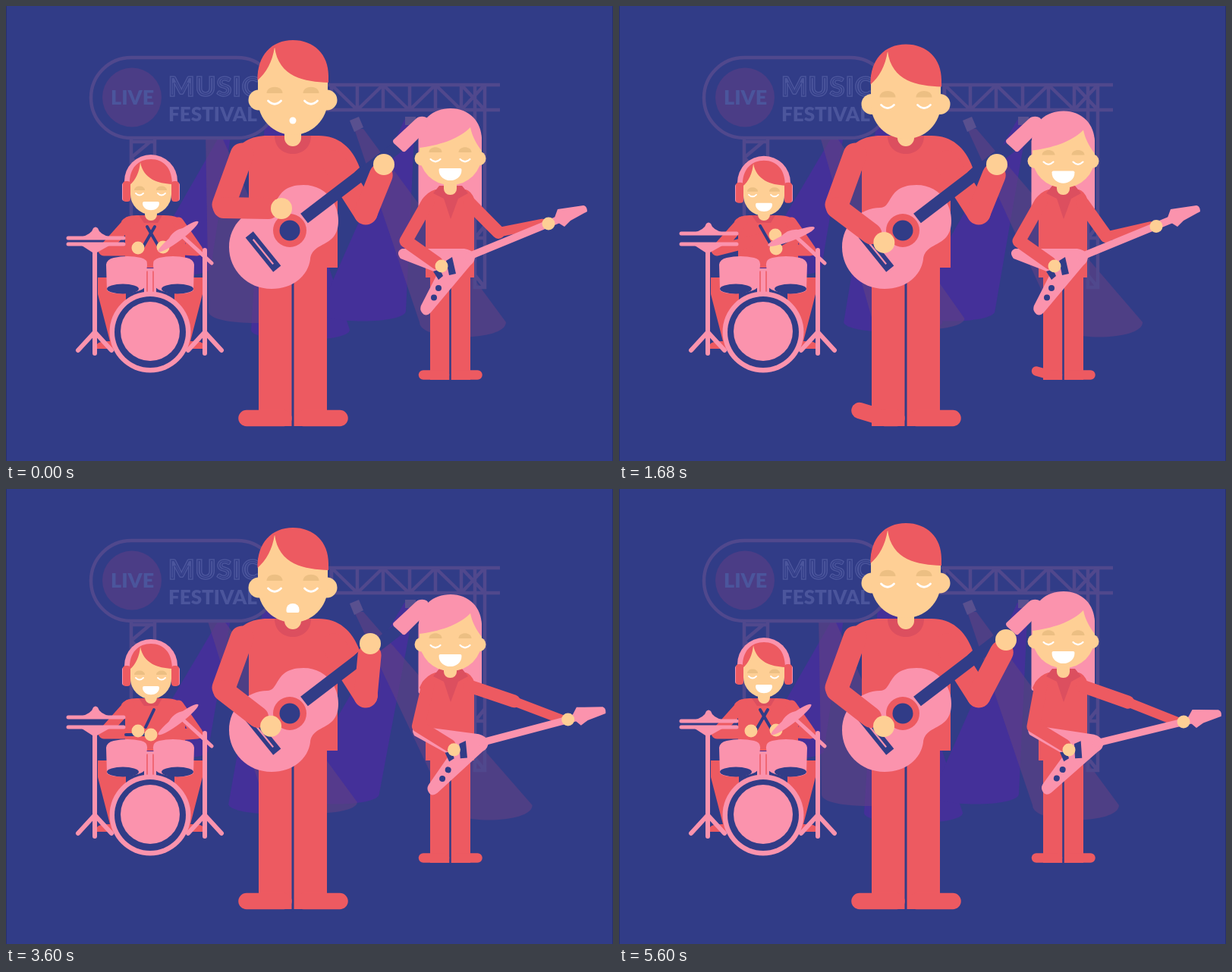
These frames come from a looping animation (800x600 px, 5640 ms). An HTML page:

```html
<!DOCTYPE html>
<html lang="en">
<head>
<meta charset="utf-8">
<title>Live Music Festival</title>
<style>
html, body { margin: 0; width: 100%; height: 100%; overflow: hidden; background: #313c87; }
svg { display: block; width: 100vw; height: 100vh; }
text { font-family: Lato, "Open Sans", sans-serif; font-weight: 900; }
.red { fill: #ed5a61; }
.pink { fill: #fb93ad; }
.skin { fill: #fecf95; }
.dark { fill: #313c87; }
.shade { fill: #dc4f5f; }
.white { fill: #fff; }
.lid { fill: #ecbf83; }
.purple { fill: #443099; }
.mauve { fill: #614184; fill-opacity: .6; }
.line { fill: none; stroke-linecap: round; stroke-linejoin: round; }
.sr { stroke: #ed5a61; }
.sp { stroke: #fb93ad; }
.sd { stroke: #313c87; }
.sw { stroke: #fff; }
.frame { fill: none; stroke: #50488d; stroke-width: 4.5; }
.sign { fill: #4b559c; }
.music { font-size: 36px; letter-spacing: 1px; }
</style>
</head>
<body>
<svg id="stage" viewBox="0 0 800 600"></svg>
<script>
const LOOP = 5640, STEP = 40;

// Markup helpers
const shape = (cls, d, id = '') => `<path id="${id}" class="${cls}" d="${d}"/>`;
const line = (cls, width, d, id = '') =>
  `<path id="${id}" class="line ${cls}" stroke-width="${width}" d="${d}"/>`;
const disc = (cls, x, y, r, id = '') => `<circle id="${id}" class="${cls}" cx="${x}" cy="${y}" r="${r}"/>`;
const box = (cls, x, y, w, h, r = 0) =>
  `<rect class="${cls}" x="${x}" y="${y}" width="${w}" height="${h}" rx="${r}"/>`;
const group = (id, ...parts) => `<g id="${id}">${parts.join('')}</g>`;

const lid = (x, y, w) => shape('lid', `M${x - w} ${y}C${x - w} ${y - w * 1.05} ${x + w} ${y - w * 1.05} ${x + w} ${y}Z`);
const eye = (x, y, w, s) => line('sw', s, `M${x - w} ${y}Q${x} ${y + w} ${x + w} ${y}`);
const eyes = (xs, lidY, eyeY, w, s) => xs.map(x => lid(x, lidY, w + 2) + eye(x, eyeY, w, s)).join('');
const smile = (x, y, w, h) =>
  shape('white', `M${x - w} ${y + 2}q0 -2 2 -2H${x + w - 2}q2 0 2 2C${x + w} ${y + h * 1.3} ${x - w} ${y + h * 1.3} ${x - w} ${y + 2}Z`);

function backdrop() {
  let truss = 'M340 104H651M340 137H651M618 104V373M631 104V373M616 306H633M616 371H633';
  [429, 463, 497, 532, 566, 600].forEach((x, i) => {
    truss += `M${x} 104V137`;
    if (i < 5) truss += i % 2 ? `M${x} 137L${x + 34} 104` : `M${x} 104L${x + 34} 137`;
  });
  truss += 'M600 104L631 137M600 137L631 104M618 306L631 290M618 355L631 371';
  truss += 'M165 176V300M196 176V300M163 179H198M165 200L190 179M165 200L196 232';
  return ['B', 'E', 'D'].map(k => shape('purple', '', 'beam' + k)).join('') +
    ['A', 'C'].map(k => shape('mauve', '', 'beam' + k)).join('') +
    shape('frame', truss) +
    '<path fill="#59508f" d="M453 151L465 146L471 160L459 166ZM526 146H540V157H526Z"/>' +
    '<rect class="frame" x="112" y="68" width="246" height="106" rx="53" style="fill:#313c87"/>' +
    '<circle cx="166" cy="120.500" r="39" fill="#4b3d86"/>' +
    '<g class="sign"><text x="138" y="130" font-size="27">LIVE</text>' +
    '<text x="214" y="152" font-size="26">FESTIVAL</text>' +
    '<text class="music" x="214" y="119" stroke="#313c87" stroke-width="4">MUSIC</text></g>' +
    '<text class="music" x="214" y="119" fill="none" stroke="#4b559c" stroke-width="1.500">MUSIC</text>';
}

function drummer() {
  const tom = shape('pink', 'M132 341Q133 334 142 332Q160 328 178 332Q187 334 186 342L183 370Q180 377 155 379Q138 380 133 375Z') +
    '<ellipse class="dark" cx="154" cy="373" rx="21" ry="6.500"/>';
  const leg = shape('red', 'M121 358H158V452H120V446Q122 442 137 442L121 380Z');
  const mirror = part => `<g transform="translate(380 0) scale(-1 1)">${part}</g>`;
  const stand = x => line('sp', 6, `M${x} 322V458M${x} 430L${x - 22} 454M${x} 430L${x + 22} 454`);
  return leg + mirror(leg) +
    shape('red', 'M172 276H208C224 276 232 280 236 290V345H157V290L152 284Q158 276 172 276Z') +
    line('sr', 15, '', 'armDL') + line('sr', 15, '', 'armDR') +
    shape('shade', 'M175 276H206L200 286H182Z') +
    box('skin', 183, 262, 16, 21, 8) +
    group('headD',
      shape('pink', 'M156 236V231A35 35 0 0 1 226 231V236Z'),
      box('skin', 164, 203, 54, 72, 27),
      shape('red', 'M163 236C162 213 175 202 191 202C208 202 219 214 219 235C200 234 181 228 177 206C176 218 171 230 163 236Z'),
      box('pink', 153, 233, 7, 24, 3), box('red', 154, 231, 10, 27, 4),
      box('pink', 222, 233, 7, 24, 3), box('red', 218, 231, 10, 27, 4),
      eyes([176, 205], 243, 247, 5, 1.8),
      smile(191, 258, 11, 11)) +
    line('sd', 4, '', 'stickL') + line('sd', 4, '', 'stickR') +
    disc('skin', 0, 0, 8.5, 'handDL') + disc('skin', 0, 0, 8.5, 'handDR') +
    stand(117) + stand(262) +
    line('sp', 5, 'M234 305L271 339') +
    line('sp', 5, 'M82 314H155') +
    shape('pink', 'M100 316H136L120 325H114Z') +
    group('hat', line('sp', 5, 'M82 306H155'), shape('pink', 'M98 305Q113 301 115 293Q118 290 121 293Q123 301 138 305Z')) +
    group('crash', '<ellipse class="pink" cx="227" cy="304" rx="33" ry="5.500"/>',
      shape('pink', 'M213 300Q227 292 241 300Z')) +
    box('pink', 182, 346, 16, 38) + line('sr', 1.5, 'M186 350V378M194 350V378') +
    tom + mirror(tom) +
    disc('pink', 190, 430, 53.5) + disc('dark', 190, 430, 47) + disc('pink', 190, 429, 39);
}

function bassist() {
  return group('hairG', box('pink', 543.5, 172, 83.5, 94, 3)) +
    box('red', 559, 350, 53, 143) + line('sd', 2.5, 'M585.500 358V494') +
    line('sr', 12.5, '', 'footG') + line('sr', 12.5, 'M594 486.500H621.500') +
    shape('red', 'M566 242H606Q613 244 617 254V358H553V278L545 262Q552 246 566 242Z') +
    shape('shade', 'M563 247L571 237H601L609 247L596 254L586 281L577 254Z') +
    box('skin', 577, 225, 17, 24, 8) +
    group('headG',
      disc('skin', 548, 201, 9.5), disc('skin', 623, 201, 9.5),
      box('skin', 545, 138, 82, 98, 40),
      shape('pink', 'M544 187V176C544 150 563 135 586 135C610 135 627 152 627 176V191C620 182 614 171 612 160C596 176 570 184 544 187Z'),
      eyes([566, 605], 193, 202, 6.5, 2.2),
      smile(585.5, 214, 15, 16)) +
    line('sr', 17, '', 'armGR') + line('sr', 12.5, '', 'wristGR') +
    group('axe',
      shape('pink', 'M522 320H604Q613 321 618 328Q619 337 612 342L560 404Q553 411 548 404Q545 400 547 395L569 352L520 333Q513 324 522 320Z'),
      line('sp', 9.5, 'M608 331L732 280'),
      shape('pink', 'M723 279L727 268L761 263Q766 264 766 271L744 283L736 291L728 286Z'),
      shape('dark', 'M580 336L588 331L593 353L584 355ZM563 350L572 347L576 356L570 361Z'),
      disc('dark', 570, 372, 4), disc('dark', 564, 384.5, 4)) +
    line('sr', 17, '', 'armGL') +
    disc('skin', 0, 0, 8.5, 'handGL') + disc('skin', 0, 0, 8.5, 'handGR');
}

function singer() {
  return box('red', 333, 340, 90, 214) + line('sd', 3, 'M378 364V556') +
    line('sr', 21.5, '', 'footS') + line('sr', 21.5, 'M392 543.500H440') +
    shape('red', 'M345 171H412C438 171 456 186 466 213L437 240V345H320V206L300 196C308 180 322 171 345 171Z') +
    shape('shade', 'M354 171H402C402 203 354 203 354 171Z') +
    box('skin', 367, 150, 22, 35, 11) +
    group('headS',
      disc('skin', 333, 124, 13.5), disc('skin', 423, 124, 13.5),
      box('skin', 332, 48, 92, 122, 46),
      shape('red', 'M331.500 98C331 65 350 45 378 45C406 45 425 64 425 92V101C394 100 359 94 354 54C351 74 343 88 331.500 98Z'),
      eyes([354, 402], 115, 125, 8.5, 2.8),
      shape('white', '', 'mouth')) +
    line('sr', 32, 'M432 206L474 272') +
    shape('pink', 'M294 318C294 288 318 266 344 266C361 266 353 236 392 236C420 236 438 258 438 283C438 320 404 309 401 334C398 356 378 373 350 373C318 373 294 348 294 318Z') +
    disc('red', 374, 296, 22) + disc('dark', 374, 296, 13.5) +
    '<g transform="rotate(51 339 324)">' + box('dark', 310, 317.5, 58, 13) + box('pink', 318, 323, 42, 2.2) + '</g>' +
    '<path d="M393 280L520 183" stroke="#313c87" stroke-width="16" fill="none"/>' +
    shape('pink', 'M511 176L540 149Q544 145 551 146Q558 147 556 154L552 166L527 191Q524 194 521 190L511 181Q509 178 511 176Z') +
    line('sr', 31, '', 'armSR') + disc('skin', 0, 0, 14, 'handSR') +
    line('sr', 31, 'M311 196L287 262') + line('sr', 28, '', 'armSL') +
    disc('skin', 0, 0, 14, 'handSL');
}

document.getElementById('stage').innerHTML =
  '<rect width="800" height="600" fill="#313c87"/>' + backdrop() + drummer() + bassist() + singer() +
  '<path fill="#272f70" d="M0 0H1V600H0ZM799 0H800V600H799Z"/>';

// Motion: each track is a list of [time, value...] with smooth steps between
const tracks = {
  bob: [[0, 0], [440, 1], [960, 1], [1360, 0], [1760, 1], [2320, 1], [2720, 0], [3060, 1], [3800, 1], [4380, 0], [4720, .5], [5300, 0]],
  tap: [[0, 0], [300, 1], [600, 0], [880, 1], [1280, 0], [1680, 1], [2100, 0], [2520, 1], [3060, 0], [3300, 1], [3600, 0]],
  swing: [[0, 0], [600, 0], [980, 1], [1400, 0], [1800, 0], [2200, 1], [2320, 1], [2720, 0], [3200, 0], [3720, 1]],
  slide: [[0, 0], [300, -7], [600, 0], [1300, 0], [1640, -7], [1720, -7], [2000, 2], [3720, 3]],
  strum: [[0, 0], [300, 1], [560, 0], [860, 1], [1250, 0], [1640, 1], [2080, 0], [2500, 1], [3060, 0], [3580, 1], [4160, 0], [4680, 1]]
};
const grips = { A: [498, 209], B: [480, 204], C: [510, 199] };
const chord = [[0, 'A'], [300, 'A'], [600, 'B'], [1000, 'B'], [1400, 'A'], [1800, 'A'], [2200, 'C'], [2700, 'C'], [3300, 'B'], [3800, 'B'], [4300, 'C']]
  .map(([t, k]) => [t, ...grips[k]]);

// left hand, right hand, left stick tail and tip, right stick tail and tip, hat lift, crash angle
const beats = {
  X: [174, 319, 207, 318, 177, 324, 196, 291, 204, 322, 186, 291, 0, -37],
  L: [174, 319, 191, 324, 158, 324, 186, 324, 184, 314, 195, 291, -5, -37],
  R: [206, 302, 207, 320, 202, 318, 186, 290, 207, 318, 228, 306, -6, -21]
};
const drums = [[0, 'X'], [440, 'R'], [840, 'L'], [920, 'L'], [1280, 'X'], [1640, 'R'], [1720, 'R'], [2100, 'L'], [2480, 'X'], [2560, 'X'],
  [3060, 'R'], [3560, 'L'], [3640, 'L'], [4160, 'R'], [4680, 'X'], [4760, 'X'], [5080, 'L'], [5400, 'X']]
  .map(([t, k]) => [t, ...beats[k]]);
// mouth width, height, top radius, bottom radius
const lips = [[0, 9, 9, 4.5, 4.5], [240, 30, 15, 7, 7], [440, 17, 12, 8, 2], [700, 0, 0, 0, 0], [1760, 0, 0, 0, 0], [2000, 17, 12, 8, 2],
  [2300, 9, 9, 4.5, 4.5], [2480, 36, 17, 7, 7], [2600, 36, 17, 7, 7], [2900, 9, 9, 4.5, 4.5], [3200, 30, 15, 7, 7],
  [3560, 17, 12, 8, 2], [3720, 17, 12, 8, 2], [4000, 9, 9, 4.5, 4.5], [4240, 0, 0, 0, 0]];

function at(keys, t) {
  let i = keys.length - 1;
  while (i > 0 && keys[i][0] > t) i--;
  const a = keys[i], b = keys[i + 1];
  if (!b) return a.slice(1);
  const p = (t - a[0]) / (b[0] - a[0]), e = p * p * (3 - 2 * p);
  return a.slice(1).map((v, j) => v + (b[j + 1] - v) * e);
}

const node = id => document.getElementById(id);
const set = (id, name, value) => node(id).setAttribute(name, value);
const move = (id, x, y) => set(id, 'transform', `translate(${x} ${y})`);
const draw = (id, ...pts) => set(id, 'd', 'M' + pts.map(p => p.join(' ')).join('L'));
const mix = (a, b, k) => a + (b - a) * k;

function beam(id, ax, ay, top, bx, by, half, drop) {
  set('beam' + id, 'd', `M${ax - top} ${ay}L${bx - half} ${by}C${bx - half} ${by + drop} ${bx + half} ${by + drop} ${bx + half} ${by}L${ax + top} ${ay}Z`);
}

// Elbow below the line from shoulder to hand
function elbow([sx, sy], [hx, hy], upper, lower) {
  const dx = hx - sx, dy = hy - sy, d = Math.hypot(dx, dy);
  if (d >= upper + lower) return [mix(sx, hx, .45), mix(sy, hy, .45)];
  const a = (upper * upper - lower * lower + d * d) / (2 * d);
  const h = Math.sqrt(Math.max(0, upper * upper - a * a));
  return [sx + (a * dx - h * dy) / d, sy + (a * dy + h * dx) / d];
}

function lights(t) {
  const k = Math.sin(Math.PI * Math.min(t, 5600) / 5600);
  beam('A', 272, 165, 9, 328 + 82 * k, 403 + 11 * k, 61, 20);
  beam('B', 350, 140, 8, 388 - 33 * k, 427 - 13 * k, 65, 18);
  beam('C', 465, 162, 6, 602 + 38.5 * k, 417, 57, 26);
  beam('D', 532, 150, 7, 470 - 39 * k, 402, 57, 18);
  beam('E', 291, 165, 6, 226 - 4 * k, 345, 44, 14);
}

function showSinger(t, bob, tap) {
  move('headS', 0, 6 * bob);
  draw('footS', [317, 543.5 - 10 * tap], [350, 543.5], [366, 543.5]);
  const hand = at(chord, t);
  draw('armSR', [474, 273], [mix(474, hand[0], .84), mix(273, hand[1], .78)]);
  move('handSR', ...hand);
  const s = at(tracks.strum, t)[0], x = mix(363, 349, s), y = mix(267, 313, s);
  draw('armSL', [287, 266], [x - 17, y - 12 * s]);
  move('handSL', x, y);

  const [w, h, r, q] = at(lips, t), l = 378 - w / 2, u = 151 - h / 2;
  set('mouth', 'd', w < 1 ? '' : `M${l} ${u + r}a${r} ${r} 0 0 1 ${r} ${-r}h${w - 2 * r}a${r} ${r} 0 0 1 ${r} ${r}` +
    `v${h - r - q}a${q} ${q} 0 0 1 ${-q} ${q}h${2 * q - w}a${q} ${q} 0 0 1 ${-q} ${-q}Z`);
}

function showBassist(t, bob, tap) {
  move('headG', 0, 4 * bob);
  move('hairG', 0, 4 * bob);
  draw('footG', [550, 486.5 - 5 * tap], [568, 486.5], [578, 486.5]);
  const k = at(tracks.swing, t)[0], slide = at(tracks.slide, t)[0];
  const turn = 8.7 * k, c = Math.cos(turn * Math.PI / 180), s = Math.sin(turn * Math.PI / 180);
  const px = 574 + 19 * k, py = 343 - k;
  set('axe', 'transform', `translate(${19 * k} ${-k}) rotate(${turn} 574 343)`);
  const u = 141 + slide, v = -56 - slide * .5;
  const hand = [px + u * c - v * s, py + u * s + v * c], shoulder = [611, 260];
  const bend = elbow(shoulder, hand, 54, 67);
  draw('armGR', shoulder, bend);
  draw('wristGR', bend, [hand[0] - 8, hand[1]]);
  move('handGR', ...hand);
  draw('armGL', [556, 259], [mix(527, 546, k), mix(310, 313, k)], [px - 6, py - 4]);
  move('handGL', px, py + 2 * k);
}

function showDrummer(t, bob) {
  move('headD', 0, 2 * bob);
  const [lx, ly, rx, ry, a, b, c, d, e, f, g, h, lift, tilt] = at(drums, t);
  draw('armDL', [162, 285], [129, 322], [lx - 10, ly + 3]);
  draw('armDR', [227, 286], [252, 322], [rx + 10, ry + 2]);
  draw('stickL', [a, b], [c, d]);
  draw('stickR', [e, f], [g, h]);
  move('handDL', lx, ly);
  move('handDR', rx, ry);
  move('hat', 0, lift);
  set('crash', 'transform', `rotate(${tilt} 227 304)`);
}

const start = performance.now();
function tick() {
  const t = Math.floor(((performance.now() - start) % LOOP) / STEP) * STEP;
  const bob = at(tracks.bob, t)[0], tap = at(tracks.tap, t)[0];
  lights(t);
  showSinger(t, bob, tap);
  showBassist(t, bob, tap);
  showDrummer(t, bob);
  requestAnimationFrame(tick);
}
tick();
</script>
</body>
</html>
```
